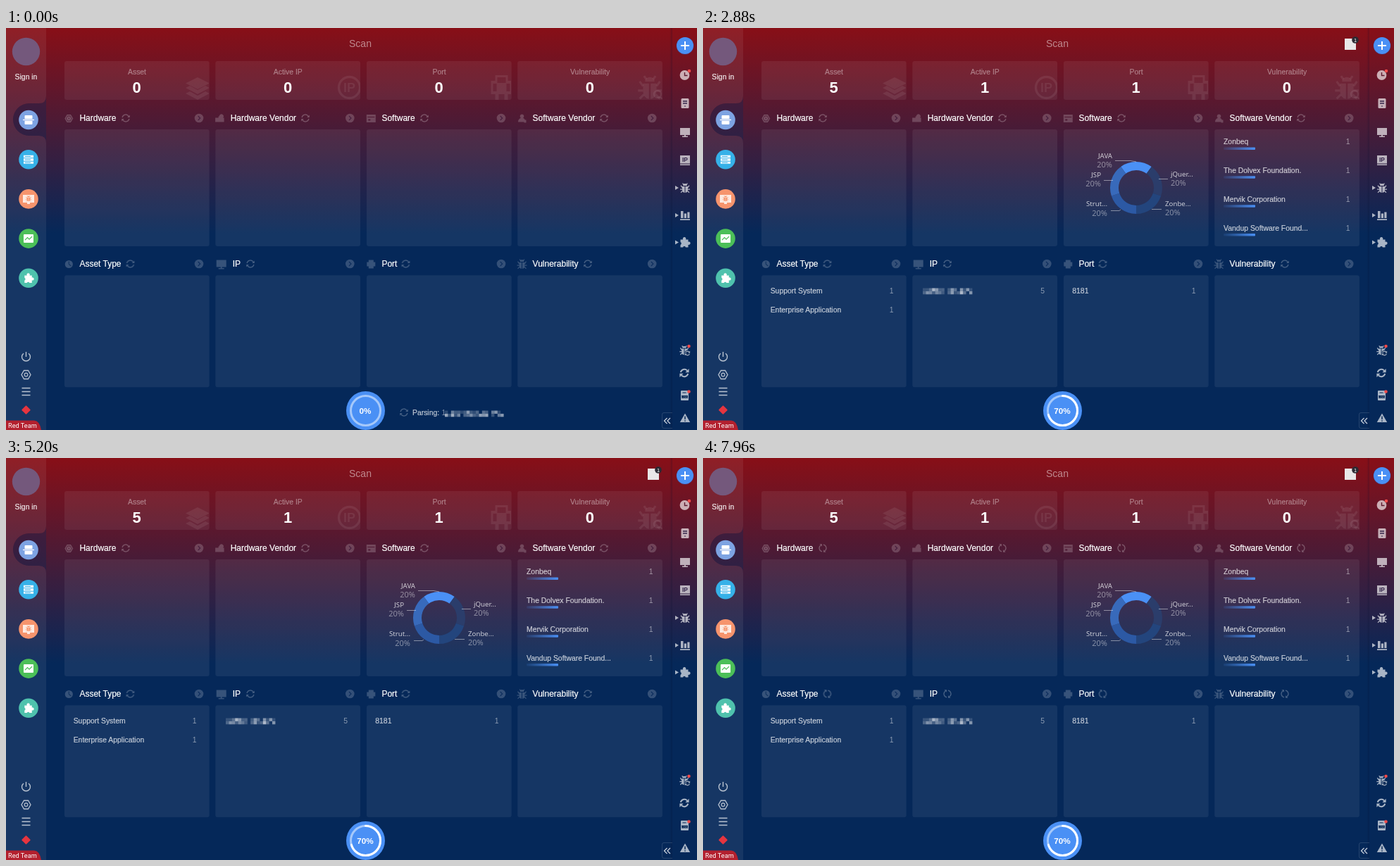
Recreate the animation shown at these times as an HTML page. Size 981 by 571 pixels, loop 8 s.

```html
<!DOCTYPE html>
<html lang="en">
<head>
<meta charset="utf-8">
<title>Scan dashboard</title>
<style>
  html, body { margin: 0; width: 100%; height: 100%; overflow: hidden; background: #05285a; }
  svg { display: block; width: 981px; height: 571px; font-family: "Liberation Sans", Arial, sans-serif; }
  .spin { transform-box: view-box; transform-origin: 0 0; }
  .pie { font-family: "Noto Sans", "Open Sans", sans-serif; }
  .firm { stroke: currentColor; stroke-width: .2px; }
</style>
</head>
<body>
<svg id="stage" viewBox="0 0 981 571" xmlns="http://www.w3.org/2000/svg">
  <defs>
    <linearGradient id="sky" gradientUnits="userSpaceOnUse" x1="0" y1="0" x2="0" y2="292">
      <stop offset="0" stop-color="#880f17"/><stop offset="1" stop-color="#052859"/>
    </linearGradient>
    <linearGradient id="bar"><stop offset="0" stop-color="#4a90f5" stop-opacity=".1"/><stop offset="1" stop-color="#4a90f5"/></linearGradient>
    <linearGradient id="edge"><stop offset="0" stop-color="#000a28" stop-opacity="0"/><stop offset="1" stop-color="#000a28" stop-opacity=".2"/></linearGradient>
    <clipPath id="statClip"><path d="M83 47h205v55H83zM297 47h206v55H297zM512 47h205v55H512zM726 47h206v55H726z"/></clipPath>

    <!-- Icons are centred on 0,0 and take their colour from "color". -->
    <g id="sync" fill="none" stroke="currentColor" stroke-width="1.3">
      <path d="M-4.9-.8A5 5 0 0 1 4.2-2.7M4.9.8A5 5 0 0 1-4.2 2.7"/>
      <path d="M5.8-4.6V-1H2.2zM-5.8 4.6V1h3.6z" fill="currentColor" stroke="none"/>
    </g>
    <g id="syncBold" fill="none" stroke="currentColor" stroke-width="2">
      <path d="M-5.200-1A5.400 5.400 0 0 1 4-3.400M5.200 1A5.400 5.400 0 0 1-4 3.400"/>
      <path d="M6.600-6V-.8H1.400zM-6.600 6V.8h5.200z" fill="currentColor" stroke="none"/>
    </g>
    <g id="bug" fill="currentColor" stroke="currentColor">
      <path d="M-2.8-3.6a2.8 2.8 0 0 1 5.6 0z" stroke="none"/>
      <path d="M-4-2.6H-.5V6.6Q-4 6-4 2zM4-2.6H.5V6.6Q4 6 4 2z" stroke="none"/>
      <path d="M-4-1-6-3.8M4-1 6-3.8M-4 1.6H-7M4 1.6H7M-3.6 4-6 6.4M3.6 4 6 6.4M-2-5-3.4-7M2-5 3.4-7" fill="none" stroke-width="1.3"/>
    </g>
    <path id="puzzle" fill="currentColor" d="M-6-4h3.6a2.3 2.3 0 1 1 4 0H5v3.2a2.2 2.2 0 1 1 0 4V7H1.4a2 2 0 0 0-3.8 0H-6V3.4a2.2 2.2 0 0 0 0-4z"/>
    <path id="monitor" fill="currentColor" d="M-7-6H7V4H1V5.5H4V7H-4V5.5H-1V4H-7z"/>
    <path id="printer" fill="currentColor" d="M-3.5-6h7v3H6v6H3.5v3h-7V3H-6v-6h2.5z"/>
    <path id="user" fill="currentColor" d="M0-6a2.9 2.9 0 0 1 1.6 5.3Q5 .8 5 5H-5.5Q-5.5.8-1.6-.7A2.9 2.9 0 0 1 0-6zM3 2h3v4H3z"/>
    <g id="chip" fill="none" stroke="currentColor"><path d="M-2.6-5h5.2L5.4 0 2.6 5h-5.2L-5.4 0z" fill="currentColor" fill-opacity=".6"/><circle r="2" stroke-width="1.2"/></g>
    <path id="vendor" fill="currentColor" d="M-6.5-1H-2V-3H0V-1a3 3 0 1 1 4.5 0H6V5H-6.5z"/>
    <path id="window" fill="currentColor" fill-rule="evenodd" d="M-6.5-5.5h13v11h-13zM-5-2.5v1h10v-1zM-4 1v2h3V1z"/>
    <g id="pieIcon"><circle r="5.6" fill="currentColor"/><path d="M0 0V-4M0 0 3 2.5" stroke="#143561" stroke-width="1.2"/></g>
  </defs>
</svg>
<script>
const stage = document.getElementById('stage');
const LOOP = 8000, TICK = 40, LOADED_AT = 920;
const BLUE = '#4a90f5';
const white = a => `rgba(255,255,255,${a})`;
const COLS = [83, 297.3, 512, 726.2];
const BOLD = 'font-weight="bold"';

const rect = (x, y, w, h, fill, rx = 0) => `<rect x="${x}" y="${y}" width="${w}" height="${h}" rx="${rx}" fill="${fill}"/>`;
const circle = (x, y, r, fill) => `<circle cx="${x}" cy="${y}" r="${r}" fill="${fill}"/>`;
const ring = (r, color, width, more = '') => `<circle r="${r}" fill="none" stroke="${color}" stroke-width="${width}" ${more}/>`;
const line = (d, color, width = 1) => `<path d="${d}" fill="none" stroke="${color}" stroke-width="${width}"/>`;
const shape = (d, fill) => `<path d="${d}" fill="${fill}" fill-rule="evenodd"/>`;
const text = (s, x, y, size = 10.4, fill = white(.72), anchor = 'start', more = '') =>
  `<text x="${x}" y="${y}" font-size="${size}" fill="${fill}" color="${fill}" text-anchor="${anchor}" ${more}>${s}</text>`;
const firmText = (s, x, y, size, fill, anchor) => text(s, x, y, size, fill, anchor, 'class="firm"');
const at = (x, y, body, scale = 1) => `<g transform="translate(${x} ${y}) scale(${scale})">${body}</g>`;
const icon = (id, x, y, color, scale = 1) => at(x, y, `<use href="#${id}" color="${color}"/>`, scale);
const spinner = (x, y) => at(x, y, `<g class="spin"><use href="#sync" color="${white(.25)}"/></g>`);

function mosaic(x, y, cols, seed, gap) {
  let out = '', s = seed;
  const rnd = () => (s = (s * 16807) % 2147483647) / 2147483647;
  for (let i = 0; i < cols; i++) for (let j = 0; j < 2; j++) {
    const a = .15 + rnd() * .5;
    if (i !== gap && rnd() > .12) out += rect(x + i * 4.4, y + j * 4.4, 4.4, 4.4, white(a.toFixed(2)));
  }
  return out;
}

function backdrop() {
  return rect(0, 0, 981, 571, 'url(#sky)')
    + shape('M0 0H57V97Q57 107 47 107H33A23 23 0 0 0 33 153H47Q57 153 57 163V571H0z', white(.065))
    + shape('M57 97Q57 107 47 107H33A23 23 0 0 0 33 153H47Q57 153 57 163z', 'rgba(5,40,89,.3)')
    + rect(942, 0, 4, 571, 'url(#edge)')
    + text('Scan', 503, 27, 14, white(.5), 'middle');
}

function leftBar() {
  const soft = white(.7);
  const nav = [
    ['#7da3e2', rect(-5.5, -6.5, 11, 13, '#fff', 1) + line('M-8 0H8', '#7da3e2', 2.6) + line('M-8 0H8', '#fff', 1.3)],
    ['#36b1e8', shape('M-7-6H7V-2.5H-7zM-7-1.5H7V2H-7zM-7 3H7V6H-7z', '#fff') + line('M-5-4.2H3M-5 .3H3M-5 4.5H3', '#36b1e8')],
    ['#f6946d', shape('M-8-6H8V5H2V7H-2V5H-8z', white(.8)) + icon('bug', 0, -.5, '#f6946d', .6)],
    ['#4cbf58', rect(-7, -6, 14, 12, '#fff', 1) + line('M-5 2-1.5-1.5 1 1 5-3', '#4cbf58', 1.3)],
    ['#4fc2ad', icon('puzzle', 0, 0, '#fff', .95)]
  ];
  return circle(28.5, 33.5, 19.7, '#74587c')
    + firmText('Sign in', 28.5, 73, 10.4, white(.9), 'middle')
    + nav.map(([color, art], i) => at(32, 130.5 + i * 56.2, circle(0, 0, 13.8, color) + art)).join('')
    + at(28.5, 467, line('M-3.5-4.8A6 6 0 1 0 3.5-4.8M0-7V0', soft, 1.4))
    + at(28.5, 492.5, line('M-3-6H3L6.5 0 3 6H-3L-6.5 0z', soft, 1.3) + ring(2.3, soft, 1.2))
    + line('M22.5 511.5h12M22.5 516.5h12M22.5 521.5h12', soft, 1.3)
    + at(28.5, 542.5, `<g transform="rotate(45)">${rect(-4.6, -4.6, 9.2, 9.2, '#e6353f', 1)}</g>`)
    + shape('M0 557.5H40Q48 558 50 571H0z', '#b3202e')
    + text('Red Team', 3, 568, 9.2, '#fff', 'start', 'font-family="Roboto, sans-serif"');
}

function rightBar() {
  const c = white(.66), dark = '#33264a', navy = '#0a2956';
  const doc = rect(-5.5, -7, 11, 14, c, 1.5) + line('M-3-3H3M-3 0H3', dark, 1.3);
  const caret = y => shape(`M950 ${y - 3}l5 3-5 3z`, c);
  const dot = (x, y) => circle(x, y, 2.3, '#f04a4a');
  return circle(964, 25.5, 12.6, 'rgba(40,80,170,.25)') + circle(964, 25, 12, BLUE) + line('M958 25h12M964 19v12', '#fff', 2)
    + at(963.5, 67, circle(0, 0, 6.9, c) + line('M0-4V.5H4', '#5e1b30', 1.4)) + dot(970, 61)
    + at(964, 107, doc + line('M-1 4H1', dark))
    + icon('monitor', 964, 148, c)
    + at(964, 188, rect(-7, -7, 14, 11.5, c) + rect(-7, 5.5, 14, 1.5, c) + text('IP', 0, 2, 8.5, dark, 'middle', BOLD))
    + icon('bug', 964, 227.5, c) + caret(227)
    + at(964, 266, shape('M-6-6h3.5V4H-6zM-1.2-2.5H2V4H-1.2zM3.3-4.5H6.5V4H3.3zM-7 5.3H7V7H-7z', c)) + caret(266)
    + icon('puzzle', 963.5, 304.5, c) + caret(304.5)
    + icon('bug', 963, 458, c, .95) + circle(967.5, 462, 4, navy) + icon('syncBold', 967.5, 462, c, .55) + dot(969.5, 452)
    + icon('syncBold', 963, 490, c)
    + at(963.5, 522, rect(-5.5, -7, 11, 14, c, 1) + rect(-4.5, 0, 9, 4, navy) + text('LOG', 0, 3.5, 4, c, 'middle') + line('M-3-4H2', navy)) + dot(969.5, 516.5)
    + at(964, 554, shape('M0-6.5 7.2 6H-7.2z', c) + line('M0-2.5V2M0 3.2V4.7', navy, 1.5))
    + line('M946 546.5H934Q931.5 546.5 931.5 549V566Q931.5 568.5 934 568.5H946', white(.13))
    + line('M938.5 554l-4 4 4 4M943 554l-4 4 4 4', white(.8), 1.2);
}

function panels() {
  const stats = ['Asset', 'Active IP', 'Port', 'Vulnerability'];
  const titles = [
    [['Hardware', 'chip', 170], ['Hardware Vendor', 'vendor', 425], ['Software', 'window', 594], ['Software Vendor', 'user', 849]],
    [['Asset Type', 'pieIcon', 176.5], ['IP', 'monitor', 347, 3], ['Port', 'printer', 567.5], ['Vulnerability', 'bug', 826]]
  ];
  let out = '';
  COLS.forEach((x, i) => {
    out += [[47, 55], [144, 166], [351.3, 159]].map(([y, h]) => rect(x, y, 205.7, h, white(.065), 3)).join('');
    out += firmText(stats[i], x + 103, 65.5, 10.4, white(.38), 'middle');
    titles.forEach((row, r) => {
      const y = r ? 335 : 128, [name, id, spinX, shift = 0] = row[i];
      out += icon(id, x + 6.3 + shift * .7, y + .5, white(.2))
        + firmText(name, x + 21.4 + shift, y + 4.3, 12, '#fff') + spinner(spinX, y)
        + circle(x + 191, y, 6.3, white(.19)) + line(`M${x + 189.7} ${y - 3}l3 3-3 3`, r ? '#0f2f5f' : '#48203f', 1.2);
    });
  });
  const ghost = white(.075);
  const marks = at(272, 87, shape('M0-17 17-8.5 0 0-17-8.5z', ghost) + shape('M-17-2-11-5 0 1 11-5 17-2 0 7zM-17 6l6-3L0 9 11 3l6 3L0 15z', ghost))
    + at(487.5, 84.5, ring(15, ghost, 3.4) + text('IP', 0, 6.5, 18, ghost, 'middle', BOLD))
    + at(703.5, 84, shape('M-9-17H9V-9H15V10H9V18H4V10H-4V18H-9V10H-15V-9H-9zM-6-14V-6H6V-14zM-12-5V6H-7V-5zM7-5V6H12V-5z', ghost))
    + icon('bug', 914, 85, ghost, 2.4) + at(925, 94, ring(5, ghost, 2.4) + line('M4 4l6 6', ghost, 2.4));
  return out + `<g clip-path="url(#statClip)">${marks}</g>`;
}

const values = list => list.map((v, i) => text(v, COLS[i] + 102.7, 92, 22, '#fff', 'middle', BOLD)).join('');

function gauge(percent) {
  const len = 2 * Math.PI * 21;
  const arc = `transform="rotate(-90)" stroke-linecap="round" stroke-dasharray="${len * percent / 100} ${len}"`;
  return at(510.5, 543.5, circle(0, 0, 27.5, BLUE) + ring(21, '#a5c8fa', 3)
    + (percent ? ring(21, '#fff', 3, arc) : '')
    + text(percent + '%', -.5, 4.2, 11.7, '#fff', 'middle', BOLD));
}

function donut() {
  const colors = [BLUE, '#2b3d6b', '#23457d', '#2c59a4', '#386abb'];
  const point = (r, deg) => {
    const a = deg * Math.PI / 180;
    return `${(615 + r * Math.sin(a)).toFixed(2)} ${(227 - r * Math.cos(a)).toFixed(2)}`;
  };
  const slices = colors.map((c, i) => {
    const a = i * 72 - 36, b = a + 72;
    return shape(`M${point(37, a)}A37 37 0 0 1 ${point(37, b)}L${point(25, b)}A25 25 0 0 0 ${point(25, a)}z`, c);
  }).join('');
  const labels = [
    ['JAVA', 581, 184.5, 'end', 'M585 188.5H607L615 190'],
    ['jQuer...', 664, 210.5, 'start', 'M647 214.5H660'],
    ['Zonbe...', 656, 252.5, 'start', 'M637 257.5H651'],
    ['Strut...', 574, 253, 'end', 'M579 259.5H591L593 258'],
    ['JSP', 565, 211.5, 'end', 'M569 216.5H582']
  ];
  return slices + '<g class="pie">' + labels.map(([name, x, y, anchor, d]) =>
    line(d, white(.45)) + text(name, x, y, 9.7, white(.75), anchor) + text('20%', x, y + 13.5, 11, white(.45), anchor)).join('') + '</g>';
}

function results() {
  const vendors = ['Zonbeq', 'The Dolvex Foundation.', 'Mervik Corporation', 'Vandup Software Found...'];
  const row = (name, count, x, right, y) => firmText(name, x, y) + text(count, right, y, 10.4, white(.5), 'end');
  return vendors.map((name, i) => {
    const y = 165 + i * 40.9;
    return row(name, 1, 739, 918.5, y) + rect(739, y + 4.4, 45, 3.5, 'url(#bar)', 1);
  }).join('')
    + row('Support System', 1, 95.7, 270.5, 376.5) + row('Enterprise Application', 1, 95.7, 270.5, 403.5)
    + row('', 5, 312, 485, 376.5) + mosaic(312, 369.5, 16, 77, 7)
    + row('8181', 1, 524.3, 699.5, 376.5)
    + donut()
    + rect(911, 15, 16, 16, '#e9e7e8') + circle(926, 17, 4.8, '#2b2a33') + text('1', 926, 19.7, 7.5, '#fff', 'middle');
}

const pending = values([0, 0, 0, 0]) + gauge(0) + spinner(565, 546)
  + firmText('Parsing:', 577, 550) + text('1', 618.5, 550, 10.4, white(.5)) + mosaic(623, 543.5, 19, 4211, -1);
const loaded = values([5, 1, 1, 0]) + gauge(70) + results();

stage.insertAdjacentHTML('beforeend', backdrop() + leftBar() + rightBar() + panels()
  + `<g id="pending">${pending}</g><g id="loaded">${loaded}</g>`);

// Hard switch from the waiting state to the scan results.
function toggle(id, before, after) {
  const cut = LOADED_AT / LOOP;
  document.getElementById(id).animate([
    { opacity: before, offset: 0 }, { opacity: before, offset: cut },
    { opacity: after, offset: cut }, { opacity: after, offset: 1 }
  ], { duration: LOOP, iterations: Infinity });
}
toggle('pending', 1, 0);
toggle('loaded', 0, 1);

// Refresh icons jump a quarter turn per tick.
for (const el of document.querySelectorAll('.spin')) {
  el.animate([{ transform: 'rotate(0deg)' }, { transform: 'rotate(360deg)' }],
    { duration: 4 * TICK, iterations: Infinity, easing: 'steps(4)' });
}
</script>
</body>
</html>
```
